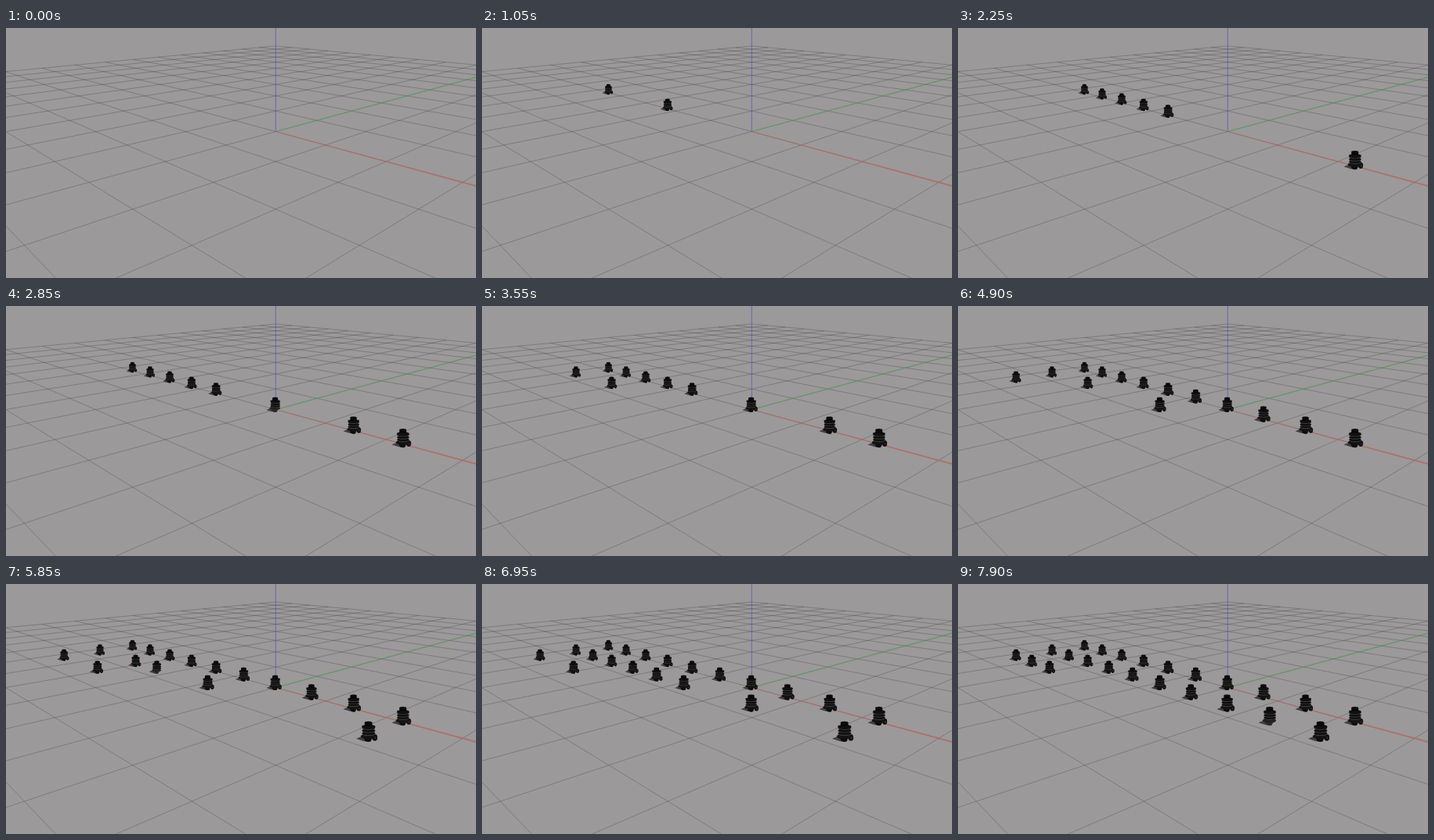
An HTML page with a canvas that plays this animation: 600x320 px, repeating every 8000 ms.

```html
<!DOCTYPE html>
<html lang="en">
<head>
<meta charset="utf-8">
<title>Robots on a grid</title>
<style>
html, body { margin: 0; width: 100%; height: 100%; overflow: hidden; background: #9b999a; }
canvas { display: block; width: 600px; height: 320px; }
</style>
</head>
<body>
<canvas id="stage"></canvas>
<script>
const W = 600, H = 320, LOOP = 8000, LAST = 7940, SETTLE = 50;
const canvas = document.getElementById('stage');
const ctx = canvas.getContext('2d');
const dpr = window.devicePixelRatio || 1;
canvas.width = W * dpr;
canvas.height = H * dpr;
ctx.scale(dpr, dpr);

// Camera at (5, -5, 2) looking at the world origin
const CX = 344.3, CY = 132.6, F = 597;
const DIST = Math.hypot(5, 5), HEIGHT = 2;
const PITCH = Math.atan2(HEIGHT, DIST);
const SIN = Math.sin(PITCH), COS = Math.cos(PITCH);
const D0 = Math.hypot(DIST, HEIGHT);

const depthAt = (x, y) => (DIST + (y - x) / Math.SQRT2) * COS + HEIGHT * SIN;

function project(x, y) {
  const ahead = DIST + (y - x) / Math.SQRT2;
  const depth = depthAt(x, y);
  return {
    x: CX + F * (x + y) / Math.SQRT2 / depth,
    y: CY - F * (ahead * SIN - HEIGHT * COS) / depth,
    depth
  };
}

function line(a, b, color, width) {
  ctx.strokeStyle = color;
  ctx.lineWidth = width;
  ctx.beginPath();
  ctx.moveTo(a.x, a.y);
  ctx.lineTo(b.x, b.y);
  ctx.stroke();
}

// Ground line from far point to near point, cut before the lens
function groundLine(x0, y0, x1, y1, color, width) {
  const near = 0.2, d0 = depthAt(x0, y0), d1 = depthAt(x1, y1);
  if (d0 < near) return;
  const k = d1 < near ? (d0 - near) / (d0 - d1) : 1;
  line(project(x0, y0), project(x0 + (x1 - x0) * k, y0 + (y1 - y0) * k), color, width);
}

function drawGround() {
  ctx.fillStyle = '#9b999a';
  ctx.fillRect(0, 0, W, H);
  const grey = 'rgba(50,50,50,.37)';
  for (let i = -10; i <= 10; i++) {
    groundLine(i, 10, i, -10, grey, 0.8);
    groundLine(-10, i, 10, i, grey, 0.8);
  }
  const o = project(0, 0), x = project(4, 0), y = project(0, 10);
  line(o, y, 'rgba(70,175,75,.75)', 0.8);
  line({ x: o.x, y: 0 }, o, 'rgba(82,80,185,.75)', 0.9);
  ctx.fillStyle = 'rgba(195,110,95,.45)';
  ctx.beginPath();
  ctx.moveTo(o.x, o.y - 0.3);
  ctx.lineTo(x.x, x.y - 1.8);
  ctx.lineTo(x.x, x.y + 1.8);
  ctx.lineTo(o.x, o.y + 0.3);
  ctx.fill();
  line(o, x, 'rgba(180,95,80,.5)', 0.6);
}

function ellipse(x, y, rx, ry, color, turn = 0) {
  ctx.fillStyle = color;
  ctx.beginPath();
  ctx.ellipse(x, y, rx, ry, turn, 0, 7);
  ctx.fill();
}

function drawRobot(bot, age) {
  const p = project(bot.x, bot.y), s = D0 / p.depth;
  const fresh = age < SETTLE;
  ctx.save();
  ctx.translate(p.x, p.y);
  ctx.scale(s, s);
  ctx.fillStyle = 'rgba(42,40,41,.8)';
  ctx.beginPath();
  ctx.moveTo(-12, 0.4);
  ctx.lineTo(-6, -2.2);
  ctx.lineTo(3, 0);
  ctx.lineTo(1, 3.3);
  ctx.lineTo(-5, 2.6);
  ctx.fill();
  // wheels and base
  if (!fresh) {
    ellipse(5.2, -0.8, 2.4, 3.1, '#111');
    ellipse(5.6, -0.7, 0.9, 1.4, '#2c2b2b');
  }
  ellipse(-1.2, 1, 3.2, 2.2, fresh ? '#2b2a2a' : '#0c0c0c', 0.2);
  ellipse(-1, -1.8, 6.8, 2.4, fresh ? '#242323' : '#131313');
  // stacked plates
  ctx.fillStyle = '#222121';
  ctx.fillRect(-5.4, -10, 9.8, 8);
  for (const y of [-4.7, -7.2, -9.9]) {
    ellipse(-0.5, y + 0.7, 6, 1.5, '#3a3939');
    ellipse(-0.5, y, 6.2, 1.5, '#0e0e0e');
  }
  // range finder
  ellipse(-0.6, -11, 6.4, 1.6, '#111');
  ctx.fillStyle = '#090909';
  ctx.fillRect(-4.2, -14.7, 7, 3.6);
  ellipse(-0.7, -14.6, 3.5, 1.2, '#0b0b0b');
  ctx.restore();
}

// column, row, time of arrival
const bots = [
  [0, 0, 350], [3, 0, 850], [2, 0, 1100], [1, 0, 1450], [4, 0, 1800],
  [9, 0, 2150], [8, 0, 2500], [6, 0, 2850], [2, 1, 3200], [0, 1, 3500],
  [5, 1, 3850], [7, 0, 4200], [5, 0, 4500], [0, 2, 4800], [2, 2, 5150],
  [9, 1, 5500], [3, 1, 5850], [4, 1, 6200], [1, 1, 6550], [7, 1, 6900],
  [6, 1, 7250], [1, 2, 7550], [8, 1, 7900]
].map(([col, row, at]) => ({ x: -4.5 + 0.75 * col, y: -0.75 * row, at }));
bots.sort((a, b) => depthAt(b.x, b.y) - depthAt(a.x, a.y));

const start = performance.now();
function frame() {
  const t = Math.min((performance.now() - start) % LOOP, LAST);
  drawGround();
  for (const bot of bots) if (t >= bot.at) drawRobot(bot, t - bot.at);
  requestAnimationFrame(frame);
}
frame();
</script>
</body>
</html>
```
